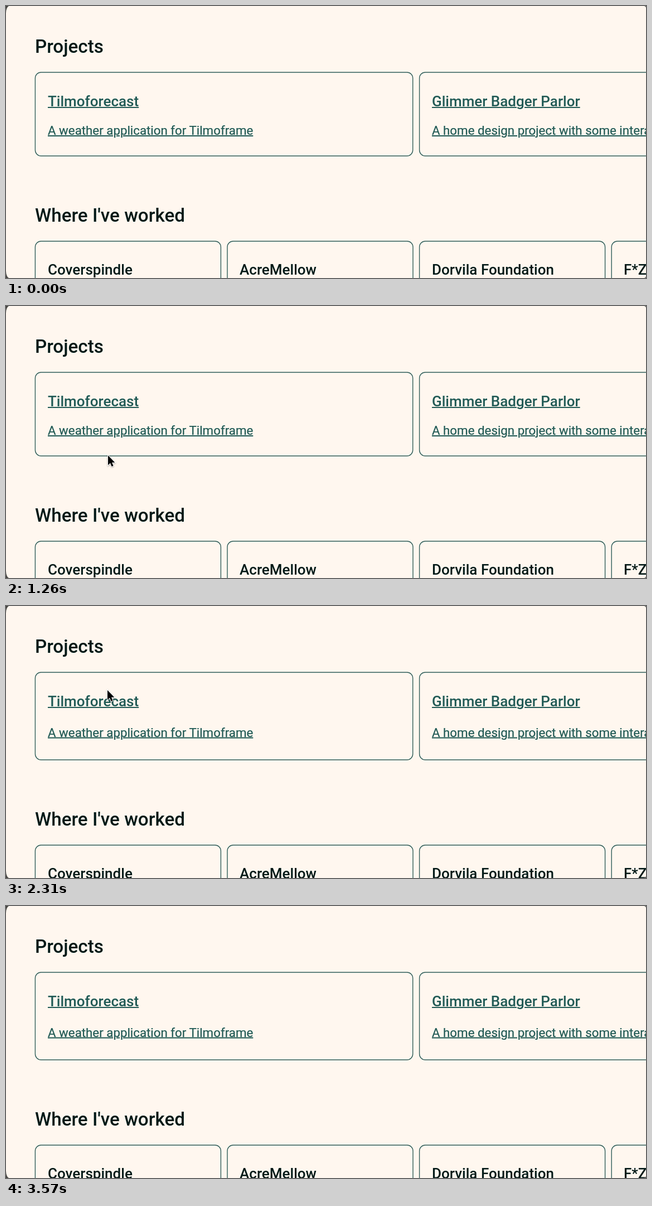
These frames come from a looping animation (1148 px wide and 488 px high, 3640 ms). An HTML page:

```html
<!DOCTYPE html>
<html lang="en">
<head>
<meta charset="utf-8">
<title>Portfolio</title>
<style>
  html, body { margin: 0; width: 100%; height: 100%; overflow: hidden; background: #454441; }
  .page {
    position: relative; width: 1148px; height: 488px; overflow: hidden;
    background: #fff7ef; border-radius: 6px 4px 4px 6px / 13px 4px 4px 13px;
    font-family: Roboto, sans-serif; color: #021917;
  }
  .page * { --loop: 3640ms infinite; }

  /* --y is the text baseline */
  .text {
    position: absolute; left: var(--x); top: calc(var(--y) - .342em);
    line-height: 0; white-space: nowrap;
  }
  h2.text { margin: 0; font-size: 33.2px; font-weight: 500; }
  .name { font-size: 26px; font-weight: 500; }
  .about {
    font-size: 22.3px; -webkit-text-stroke: .25px;
    animation: nudge step-end var(--loop); --shift: 3.5px;
  }
  .link {
    color: #205a55; text-decoration: underline; text-underline-offset: 1px;
    text-decoration-thickness: 2px;
  }
  .cards { position: absolute; inset: 0; width: 100%; height: 100%; }
  .cards rect { fill: none; stroke: #315f5b; stroke-width: 1.4px; rx: 10.5px; }
  .project { y: 119px; width: 677.3px; height: 150px; animation: grow step-end var(--loop); }
  .job { y: 422px; width: 333px; height: 150px; }
  .work { position: absolute; inset: 0; animation: nudge step-end var(--loop); --shift: 7px; }

  .cursor {
    position: absolute; left: 0; top: 0; width: 1px; height: 1px; overflow: visible;
    filter: drop-shadow(0 1px 1px #0005); animation: travel var(--loop);
  }
  .arrow { animation: arrow step-end var(--loop); }
  .beam { animation: beam step-end var(--loop); }
  .hand { animation: hand step-end var(--loop); }

  @keyframes nudge { 0% { transform: none } 49.99%, 100% { transform: translateY(var(--shift)) } }
  @keyframes grow { 0% { height: 150px } 49.99%, 100% { height: 157px } }

  /* The pointer advances every 70 ms, 52 times per loop */
  @keyframes travel {
    0%, 13.46% { transform: translate(112px, 478px); animation-timing-function: steps(3) }
    19.23% { transform: translate(138px, 366px); animation-timing-function: steps(4) }
    26.92% { transform: translate(165px, 305px); animation-timing-function: steps(4) }
    34.61% { transform: translate(183px, 268px); animation-timing-function: steps(4) }
    42.30% { transform: translate(184px, 240px); animation-timing-function: steps(3) }
    48.07% { transform: translate(184px, 228px); animation-timing-function: steps(2) }
    51.92%, 55.76% { transform: translate(184px, 222px); animation-timing-function: steps(4) }
    63.46% { transform: translate(182px, 151px); animation-timing-function: steps(3) }
    69.23% { transform: translate(171px, 74px); animation-timing-function: steps(5) }
    78.84% { transform: translate(154px, 18px); animation-timing-function: step-end }
    82.69% { transform: translate(153px, 15px); animation-timing-function: steps(4) }
    90.38%, 100% { transform: translate(149px, -20px) }
  }
  @keyframes arrow {
    0% { opacity: 0 } 13.46% { opacity: 1 } 17.30% { opacity: 0 } 21.15% { opacity: 1 }
    44.23% { opacity: 0 } 63.46% { opacity: 1 } 90.38%, 100% { opacity: 0 }
  }
  @keyframes beam { 0% { opacity: 0 } 17.30% { opacity: 1 } 21.15%, 100% { opacity: 0 } }
  @keyframes hand { 0% { opacity: 0 } 44.23% { opacity: 1 } 63.46%, 100% { opacity: 0 } }
</style>
</head>
<body>
<main class="page">
  <h2 class="text" style="--x:52px;--y:84px">Projects</h2>
  <svg class="cards">
    <rect class="project" x="52.4"/>
    <rect class="project" x="741.6"/>
  </svg>
  <div class="text name link" style="--x:75px;--y:179.5px">Tilmoforecast</div>
  <div class="text about link" style="--x:75px;--y:231px">A weather application for Tilmoframe</div>
  <div class="text name link" style="--x:764px;--y:179.5px">Glimmer Badger Parlor</div>
  <div class="text about link" style="--x:764px;--y:231px">A home design project with some interactive</div>

  <section class="work">
    <h2 class="text" style="--x:52px;--y:387px">Where I've worked</h2>
    <svg class="cards">
      <rect class="job" x="52.4"/>
      <rect class="job" x="397"/>
      <rect class="job" x="741.6"/>
      <rect class="job" x="1086.2"/>
    </svg>
    <div class="text name" style="--x:75px;--y:482px">Coverspindle</div>
    <div class="text name" style="--x:419px;--y:482px">AcreMellow</div>
    <div class="text name" style="--x:764px;--y:482px">Dorvila Foundation</div>
    <div class="text name" style="--x:1108px;--y:482px">F*ZOLAN</div>
  </section>

  <svg class="cursor">
    <defs>
      <path id="bar" d="M-4.5 -11.5Q0 -11.5 0 -8.5Q0 -11.5 4.5 -11.5M0 -8.5V8M-4.5 11Q0 11 0 8Q0 11 4.5 11M-3 5H3"/>
    </defs>
    <path class="arrow" d="M0 0V17.5L4 13.8L6.6 20L9.6 18.7L7 12.7H12.3Z"
      stroke="#fff" stroke-width="2" paint-order="stroke"/>
    <g class="beam" fill="none">
      <use href="#bar" stroke="#fff" stroke-width="3"/>
      <use href="#bar" stroke="#000" stroke-width="1.4"/>
    </g>
    <g class="hand" stroke="#000" stroke-width="1.4" stroke-linejoin="round">
      <path fill="#fff" d="M-2.6 12V1.2C-2.6 -.8 .8 -.8 .8 1.2V7.5C1.2 6 4.4 6.2 4.4 8.2C5 7 7.9 7.2 7.9 9.2
        C8.6 8.2 11 8.4 11 10.6V15C11 18 9.2 19 9.2 22H-3.2C-3.4 20 -6 18 -8.6 14.4C-9.8 12.6 -7.4 11.2 -5.8 12.6L-2.6 15.4Z"/>
      <path d="M1.2 13.5v5M4 13.5v5M6.8 13.5v5"/>
    </g>
  </svg>
</main>
</body>
</html>
```
